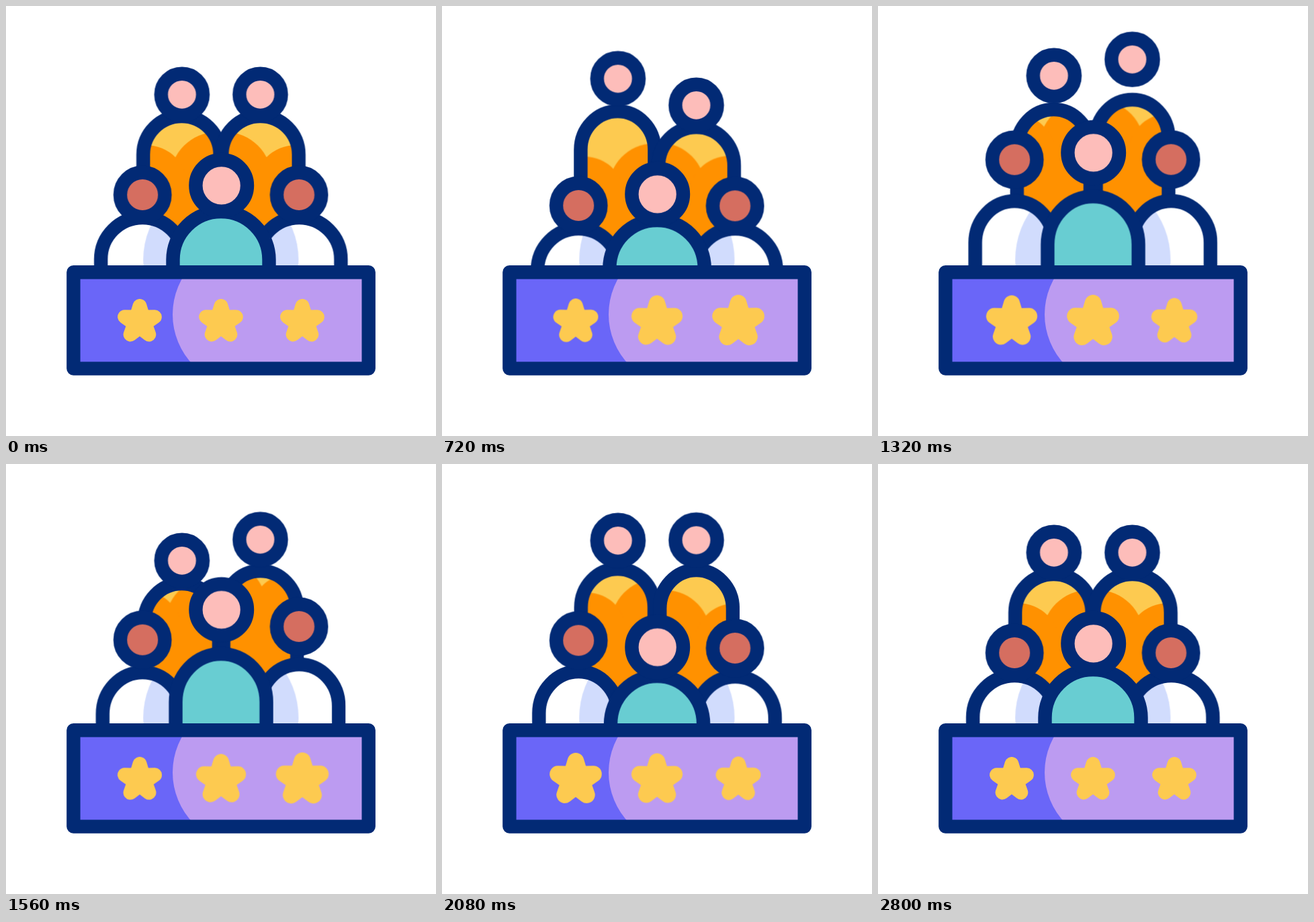
Write an HTML page that moves like this. It is 640 by 640 pixels and loops after 3.6 s.

```html
<!DOCTYPE html>
<html lang="en">
<head>
<meta charset="utf-8">
<title>Jury</title>
<style>
html, body { margin: 0; width: 100%; height: 100%; overflow: hidden; background: #fff; }
svg { display: block; width: 100%; height: 100%; }

.line { stroke: #022a75; stroke-width: 20.4; stroke-linejoin: round; vector-effect: non-scaling-stroke; }
.pink { fill: #fdbdba; }
.brown { fill: #d56e60; }
.yellow { fill: #fdca50; }
.orange { fill: #ff9100; }
.white { fill: #fff; }
.shade { fill: #d1dcfd; }
.teal { fill: #68cdd2; }
.star { fill: #fdca50; stroke: #fdca50; stroke-width: 21; stroke-linejoin: round; }

.head, .body, .still, .wave, .sway, .star {
  animation: 3.6s cubic-bezier(.37, 0, .63, 1) var(--d, 0s) infinite;
}
.head { animation-name: head; }
.body { animation-name: body; }
.still { animation-name: still; }
.wave { animation-name: wave; }
.sway { animation-name: sway; }
.star { animation-name: pulse; }

/* crouch, jump, land, small hop, rest */
@keyframes head {
  13.333% { transform: translateY(17px); animation-timing-function: cubic-bezier(.33, 0, .3, 1); }
  30% { transform: translateY(-53px); animation-timing-function: cubic-bezier(.5, 0, .7, 1); }
  43.333% { transform: translateY(12px); }
  55% { transform: translateY(-23px); }
  0%, 63.9%, 100% { transform: translateY(0); }
}
@keyframes body {
  13.333% { transform: translateY(17px) scaleX(.985); animation-timing-function: cubic-bezier(.33, 0, .3, 1); }
  30% { transform: translateY(-25px) scaleX(.943); animation-timing-function: cubic-bezier(.5, 0, .7, 1); }
  43.333% { transform: translateY(14px) scaleX(.97); }
  55% { transform: translateY(-9px) scaleX(.947); }
  0%, 66.667%, 100% { transform: translateY(0) scaleX(1); }
}
/* cancels the body's rise for shading that has its own path */
@keyframes still {
  13.333% { transform: translateY(-17px); animation-timing-function: cubic-bezier(.33, 0, .3, 1); }
  30% { transform: translateY(25px); animation-timing-function: cubic-bezier(.5, 0, .7, 1); }
  43.333% { transform: translateY(-14px); }
  55% { transform: translateY(9px); }
  0%, 66.667%, 100% { transform: translateY(0); }
}
@keyframes wave {
  19.167% { transform: translateY(20px); animation-timing-function: cubic-bezier(.25, .1, .25, 1); }
  33.889% { transform: translateY(-48px); animation-timing-function: cubic-bezier(.5, 0, .7, 1); }
  49.444% { transform: translateY(5px); }
  58.6% { transform: translateY(-16px); }
  0%, 3.333%, 66.667%, 100% { transform: translateY(0); }
}
@keyframes sway {
  14.444% { transform: translateX(-3px); }
  25% { transform: translateX(7px); }
  41.667% { transform: translateX(-9px); }
  54.444% { transform: translateX(7px); }
  0%, 66.667%, 100% { transform: translateX(0); }
}
@keyframes pulse {
  11.111%, 33.333%, 55.556% { transform: scale(1.2); }
  0%, 22.222%, 44.444%, 66.667%, 100% { transform: scale(1); }
}
</style>
</head>
<body>
<svg viewBox="0 0 640 640">
  <defs>
    <path id="back" d="M-57.2 440V221.2a57.2 57.2 0 0 1 114.4 0V440"/>
    <path id="side" d="M-62 440V377a62 62 0 0 1 124 0V440"/>
    <path id="mid" d="M-71.5 440V377.5a71.5 71.5 0 0 1 143 0V440"/>
    <clipPath id="backClip"><use href="#back"/></clipPath>
    <clipPath id="sideClip"><use href="#side"/></clipPath>
    <g id="humps">
      <circle cx="52.7" cy="257" r="69.6"/>
      <circle cx="-53.3" cy="270" r="63"/>
      <path d="M-80 250H80V520H-80z"/>
    </g>
    <circle id="shadow" cx="123" cy="378" r="122"/>
    <path id="star" d="M0-23.5 5-6.88 22.35-7.26 8.08 2.63 13.81 19.01 0 8.5-13.81 19.01-8.08 2.63-22.35-7.26-5-6.88z"/>
  </defs>

  <!-- back row -->
  <g transform="translate(261.4)">
    <g class="body">
      <use href="#back" class="yellow"/>
      <g clip-path="url(#backClip)"><g class="still"><g class="wave"><g class="sway">
        <use href="#humps" class="orange"/>
      </g></g></g></g>
      <path class="line" fill="none" d="M-57.2 440V221.2a57.2 57.2 0 0 1 114.4 0V440"/>
    </g>
    <circle class="head line pink" cx=".5" cy="131.8" r="31.1"/>
  </g>
  <g transform="translate(378.5)" style="--d:.2s">
    <g class="body">
      <use href="#back" class="yellow"/>
      <g clip-path="url(#backClip)"><g class="still"><g class="wave"><g class="sway">
        <use href="#humps" class="orange" transform="scale(-1 1)"/>
      </g></g></g></g>
      <path class="line" fill="none" d="M-57.2 440V221.2a57.2 57.2 0 0 1 114.4 0V440"/>
    </g>
    <circle class="head line pink" cy="131.8" r="31.1"/>
  </g>

  <!-- front row -->
  <g transform="translate(203.2)" style="--d:.2s">
    <g class="body">
      <use href="#side" class="white"/>
      <g clip-path="url(#sideClip)"><g class="still">
        <use href="#shadow" class="shade"/>
      </g></g>
      <path class="line" fill="none" d="M-62 440V377a62 62 0 0 1 124 0V440"/>
    </g>
    <circle class="head line brown" cy="281" r="33.2"/>
  </g>
  <g transform="translate(436.4)" style="--d:.3s">
    <g class="body">
      <use href="#side" class="white"/>
      <g clip-path="url(#sideClip)"><g class="still">
        <use href="#shadow" class="shade" transform="scale(-1 1)"/>
      </g></g>
      <path class="line" fill="none" d="M-62 440V377a62 62 0 0 1 124 0V440"/>
    </g>
    <circle class="head line brown" cx="-.3" cy="281" r="33.2"/>
  </g>
  <g transform="translate(320)" style="--d:.4s">
    <g class="body">
      <path class="line teal" d="M-71.5 440V377.5a71.5 71.5 0 0 1 143 0V440"/>
    </g>
    <circle class="head line pink" cx=".7" cy="267.3" r="38.3"/>
  </g>

  <!-- desk -->
  <clipPath id="deskClip"><path d="M100 396H540V540H100z"/></clipPath>
  <path fill="#6a66f8" d="M100 396H540V540H100z"/>
  <g clip-path="url(#deskClip)" fill="#bc9bf1">
    <circle cx="356" cy="459" r="108"/>
    <path d="M350 390H545V545H350z"/>
  </g>
  <path class="line" fill="none" d="M100.4 396.2H539.7V539.6H100.4z"/>
  <g transform="translate(199 470)"><use href="#star" class="star"/></g>
  <g transform="translate(320 470)" style="--d:.2s"><use href="#star" class="star"/></g>
  <g transform="translate(441 470)" style="--d:.4s"><use href="#star" class="star"/></g>
</svg>
</body>
</html>
```
